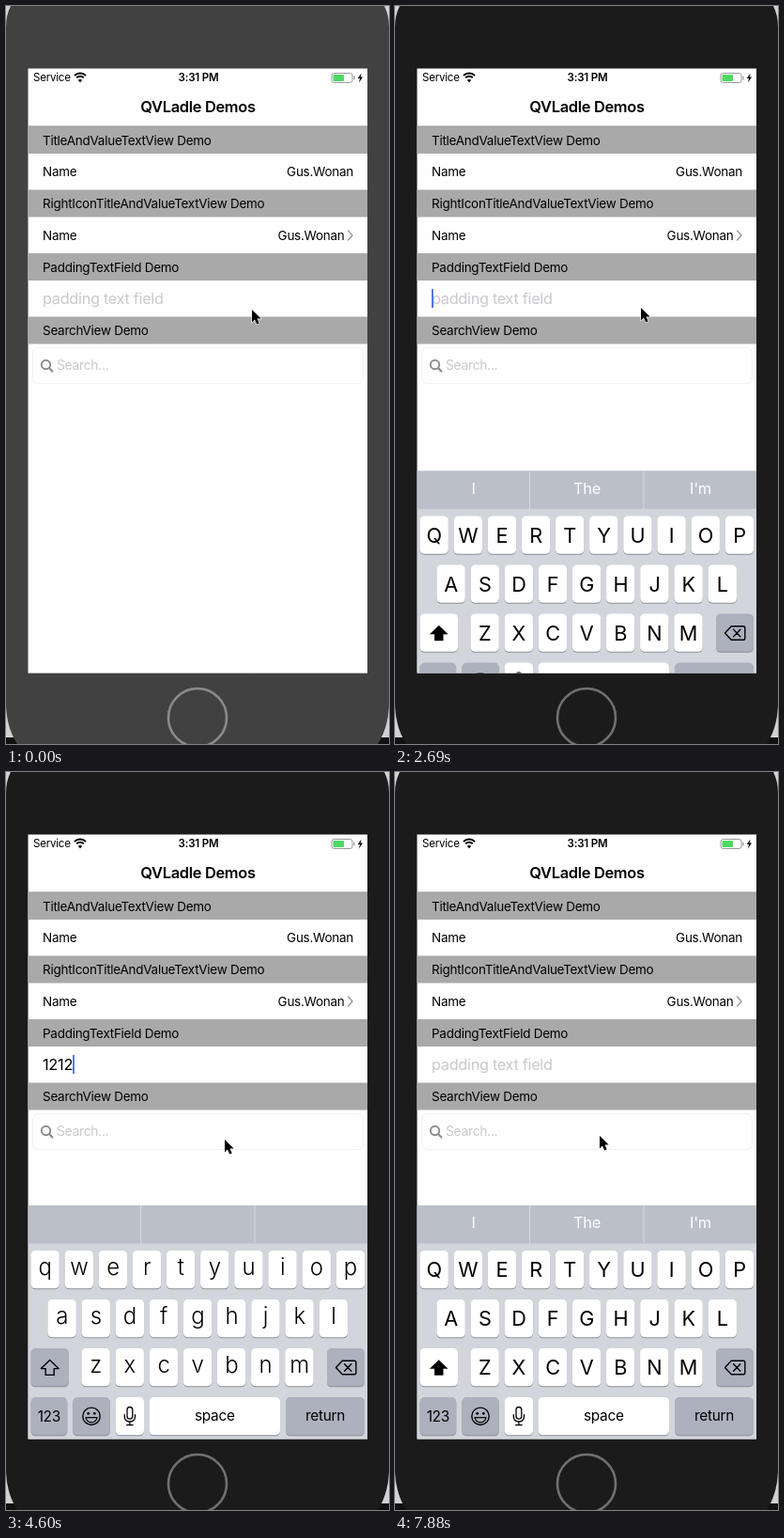
An HTML page for the animation above (8000 ms loop, 408 by 785 pixels).

```html
<!DOCTYPE html>
<html lang="en">
<head>
<meta charset="utf-8">
<title>Form demo on a phone</title>
<style>
  html, body { margin: 0; width: 100%; height: 100%; overflow: hidden; }
  svg { display: block; width: 408px; height: 785px; font-family: Inter, Roboto, sans-serif; }
  text { letter-spacing: -.0187em; white-space: pre; }
</style>
</head>
<body>
<svg id="stage" viewBox="0 0 408 785"></svg>
<script>
const LOOP = 8000;
const TYPED = '121212121';
const WORDS = ['I', 'The', "I'm"];
const BLANK = ['', '', ''];

// Each step changes part of the state and holds until the next one.
const steps = [
  [0, { active: false, cursor: [261, 322], chars: 0, caret: 0, words: WORDS }],
  [1050, { cursor: [261, 321] }],
  [1200, { cursor: [261, 320] }],
  [2400, { active: true }],
  [2540, { caret: 1 }],
  [2690, {}],
  [2840, {}],
  [2980, { cursor: [256, 334] }],
  [3130, { cursor: [244, 364], caret: .5 }],
  [3280, { cursor: [235, 385], caret: 0 }],
  [3420, { cursor: [232, 390] }],
  [3570, { caret: .5 }],
  [3720, { caret: 1 }],
  [4010, { chars: 1, words: BLANK }],
  [4160, { chars: 2 }],
  [4310, { chars: 3 }],
  [4600, { chars: 4 }],
  [4750, { chars: 6 }],
  [4900, { chars: 7 }],
  [5190, { chars: 8 }],
  [5340, { words: ['“12121212”', '', ''] }],
  [5490, { chars: 9 }],
  [5640, { words: BLANK }],
  [5790, { chars: 8 }],
  [5940, { chars: 7 }],
  [6090, { chars: 6 }],
  [6240, { chars: 5 }],
  [6390, { chars: 4 }],
  [6530, { chars: 3 }],
  [6680, { chars: 2 }],
  [6830, { chars: 1 }],
  [6980, { chars: 0 }],
  [7430, { words: WORDS, caret: .6 }],
  [7580, { cursor: [228, 389], caret: 0 }],
  [7730, { cursor: [220, 387] }],
  [7880, { cursor: [217, 386] }],
];

const rect = (x, y, w, h, fill, more = '') =>
  `<rect x="${x}" y="${y}" width="${w}" height="${h}" fill="${fill}" ${more}/>`;
const path = (d, more = '') => `<path d="${d}" ${more}/>`;
const line = (d, color, width = 1.4) =>
  path(d, `fill="none" stroke="${color}" stroke-width="${width}" stroke-linecap="round" stroke-linejoin="round"`);
const text = (x, y, size, str, more = '') =>
  `<text x="${x}" y="${y}" font-size="${size}" ${more}>${str}</text>`;
const MID = 'text-anchor="middle"', END = 'text-anchor="end"', BOLD = 'font-weight="600"';

function keyboardDrop(time) {
  if (time < 2540) return 248;
  const u = (time - 2498) * .01826;
  return 248 * (1 + u) * Math.exp(-u);
}

function body(active) {
  return rect(0, 0, 408, 778, '#d2d2d2') + rect(0, 778, 408, 7, '#111') +
    path('M5 0Q0 10 0 22V745Q1 768 12 785H396Q407 768 408 745V22Q408 10 403 0Z',
      `fill="${active ? '#1b1b1b' : '#414141'}"`) +
    `<circle cx="204" cy="757" r="31" fill="none" stroke="${active ? '#707070' : '#8b8b8b'}" stroke-width="2.6"/>` +
    rect(23.5, 66.5, 361.5, 643, '#fefefe');
}

function statusBar() {
  const arc = r => line(`M${79 - r * .7} ${80 - r * .7}A${r} ${r} 0 0 1 ${79 + r * .7} ${80 - r * .7}`, '#000', 1.9)
    .replace('"round"', '"butt"');
  return text(29, 80, 11.55, 'Service') + arc(8.6) + arc(5.4) +
    path('M79 81.3L76.7 78.8Q79 77 81.3 78.8Z') +
    text(205, 80, 11.55, '3:31 PM', `${MID} ${BOLD}`) +
    rect(347, 71.5, 22, 10, 'none', 'rx="2.5" stroke="#999"') +
    rect(348.5, 73, 11.5, 7, '#4cd964', 'rx="1"') + rect(370.3, 74.5, 1.3, 4, '#999', 'rx=".6"') +
    path('M378.6 71.5L374.7 77H377L376 81.4L380 75.6H377.6Z') +
    text(204.5, 112.5, 16.4, 'QVLadle Demos', `${MID} ${BOLD}`);
}

function form(chars) {
  const headers = ['TitleAndValueTextView', 'RightIconTitleAndValueTextView', 'PaddingTextField', 'SearchView'];
  return headers.map((name, i) => {
    const y = 128 + i * 67.5;
    return rect(23.5, y, 361.5, 29, '#a9a9a9') + text(39, y + 19.5, 13.48, name + ' Demo');
  }).join('') +
    rect(23.5, 127.5, 361.5, .7, '#929292') +
    text(39, 181.3, 13.48, 'Name') + text(370, 181.3, 13.48, 'Gus.Wonan', END) +
    text(39, 248.8, 13.48, 'Name') + text(360.5, 248.8, 13.48, 'Gus.Wonan', END) +
    line('M364.5 239L369 244L364.5 249', '#999', 1.3) +
    (chars ? text(39, 316.8, 16.4, TYPED.slice(0, chars), 'id="typed"')
      : text(39, 317.3, 16.3, 'padding text field', 'fill="#c9c9ce"')) +
    rect(28.5, 363.5, 352, 38, 'none', 'rx="6" stroke="#f1f1f1"') +
    '<circle cx="42.5" cy="381.5" r="4.7" fill="none" stroke="#8c8c8c" stroke-width="1.9"/>' +
    line('M46.2 385.3L49.3 388.6', '#8c8c8c', 2.2) +
    text(54, 387.3, 13.8, 'Search...', 'fill="#c9c9ce"');
}

function key(x, y, w, fill = '#fff') {
  return rect(x, y + 1, w, 40.3, '#8c8f95', 'rx="4.8"') + rect(x, y, w, 40.3, fill, 'rx="4.8"');
}

function keyboard(upper, words) {
  const DARK = '#adb1be', PITCH = 36.14;
  const letters = [['QWERTYUIOP', 41.6], ['ASDFGHJKL', 59.6], ['ZXCVBNM', 95.6]].map(([row, start], r) =>
    [...row].map((ch, i) => {
      const x = start + i * PITCH, y = 509 + r * 52;
      return key(x - 15.2, y, 30.4) + (upper
        ? text(x, y + 28.4, 21.7, ch, MID)
        : text(x, y + 26.2, 24, ch.toLowerCase(), `${MID} font-weight="300"`));
    }).join('')).join('');

  const bar = rect(23.5, 461, 361.5, 40.5, '#bbbfca') +
    rect(143, 461, 1, 40.5, '#d5d8de') + rect(264.5, 461, 1, 40.5, '#d5d8de') +
    words.map((word, i) => text(83.5 + i * 121, 485.3, 16.4, word, `${MID} fill="#fff"`)).join('');

  const shift = key(26.5, 613, 40.5, upper ? '#fff' : DARK) +
    path('M46.7 625.6L56 634.6H51.2V641.4H42.2V634.6H37.4Z',
      `fill="${upper ? '#000' : 'none'}" stroke="#000" stroke-width="${upper ? .5 : 1.4}" stroke-linejoin="round"`);

  const erase = key(342, 613, 40, DARK) +
    line('M351.5 633.5L358.3 626.3H371Q372.8 626.3 372.8 628.1V638.9Q372.8 640.7 371 640.7H358.3Z' +
      'M360.6 629.8L367.8 637.2M367.8 629.8L360.6 637.2', '#000');

  const emoji = key(71.2, 665, 39.6, DARK) +
    '<circle cx="91" cy="685.3" r="9.2" fill="none" stroke="#000" stroke-width="1.4"/>' +
    '<circle cx="87.7" cy="682.3" r="1.4"/><circle cx="94.3" cy="682.3" r="1.4"/>' +
    line('M85 686.6H97Q95.8 691.8 91 691.8T85 686.6Z', '#000', 1.2);

  const mic = key(116.6, 665, 30.4) +
    rect(129, 675.5, 5.8, 12.6, 'none', 'rx="2.9" stroke="#000" stroke-width="1.3"') +
    line('M126.3 683.6V685.6Q126.3 691 131.9 691T137.5 685.6V683.6M131.9 691V694.6M128.6 694.6H135.2', '#000', 1.3);

  return rect(23.5, 461, 361.5, 249, '#d2d5db') + bar + letters + shift + erase + emoji + mic +
    key(26.5, 665, 38.7, DARK) + text(45.8, 691, 15.4, '123', MID) +
    key(152.5, 665, 139.5) + text(222.3, 690, 15.4, 'space', MID) +
    key(298, 665, 84, DARK) + text(340, 690, 15.4, 'return', MID);
}

function cursor([x, y]) {
  return path('M1 1V14.4L4 11.5L6.2 16.6L8.7 15.5L6.5 10.6H10.6Z',
    `transform="translate(${x} ${y})" stroke="#fff" stroke-width="1.1" paint-order="stroke"`);
}

const stage = document.getElementById('stage');

function draw(index) {
  const state = Object.assign({}, ...steps.slice(0, index + 1).map(step => step[1]));
  const drop = keyboardDrop(steps[index][0]).toFixed(1);
  stage.innerHTML =
    `<clipPath id="screen">${rect(23.5, 66.5, 361.5, 643, '#fff')}</clipPath>` +
    body(state.active) + statusBar() + form(state.chars) +
    rect(39, 301, 1.8, 20, '#426be8', `id="caret" opacity="${state.caret}"`) +
    `<g clip-path="url(#screen)"><g transform="translate(0 ${drop})">${keyboard(!state.chars, state.words)}</g></g>` +
    cursor(state.cursor);
  const typed = document.getElementById('typed');
  if (typed) document.getElementById('caret').setAttribute('x', 39 + typed.getComputedTextLength());
}

let shown = -1;
function tick() {
  const time = performance.now() % LOOP;
  const index = steps.findLastIndex(step => step[0] <= time);
  if (index !== shown) draw(shown = index);
  requestAnimationFrame(tick);
}
tick();
</script>
</body>
</html>
```
